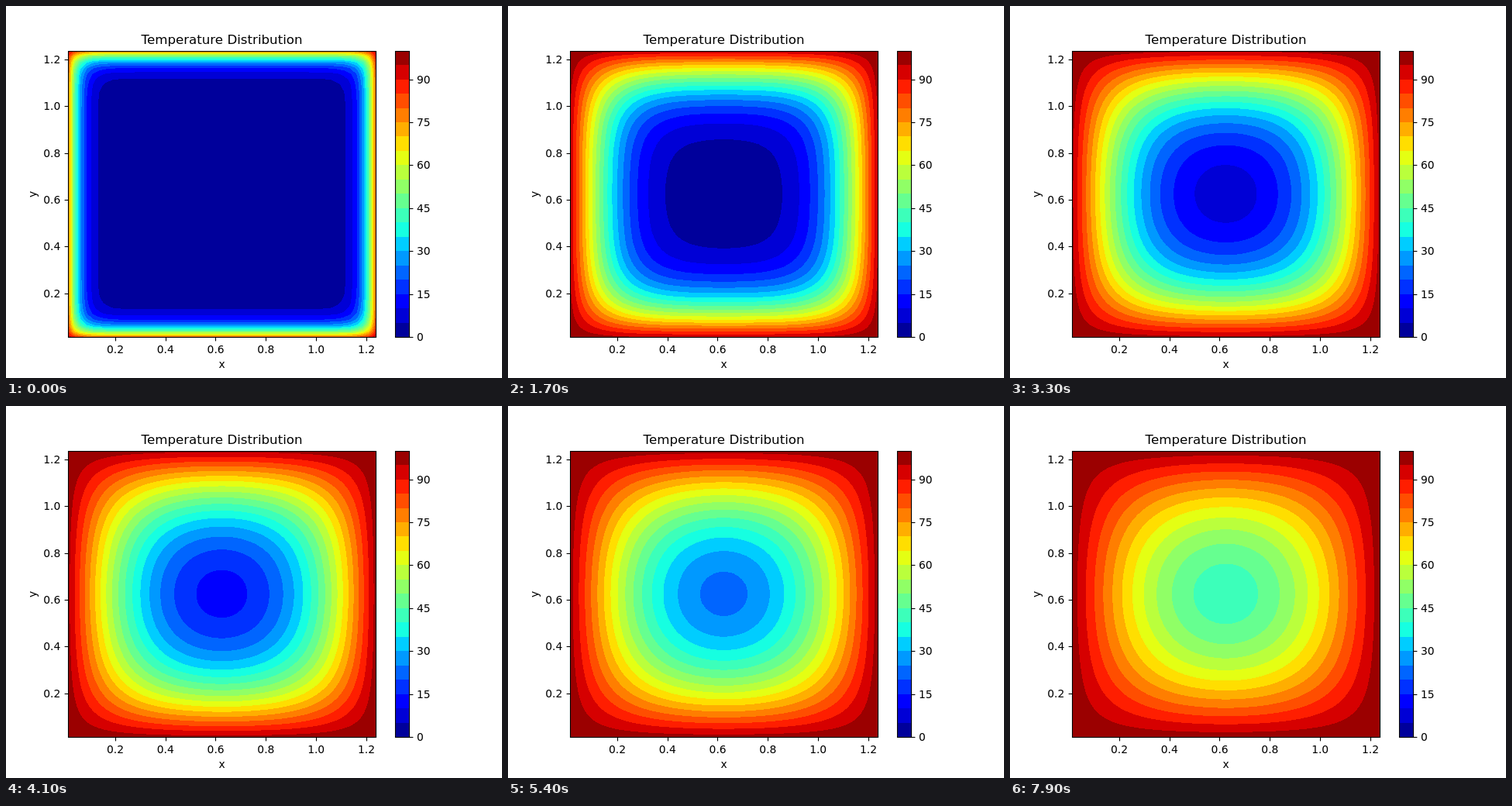
An HTML page with a canvas for the animation above (8000 ms loop, 640 px wide and 480 px high).

```html
<!DOCTYPE html>
<html lang="en">
<head>
<meta charset="utf-8">
<title>Temperature Distribution</title>
<style>
  html, body { margin: 0; width: 100%; height: 100%; overflow: hidden; background: #fff; }
  canvas, svg { position: absolute; left: 0; top: 0; }
  text { font: 13.89px "DejaVu Sans", sans-serif; }
  .title { font-size: 16.67px; }
  path, rect { fill: none; stroke: #000; stroke-width: 1.11; }
</style>
</head>
<body>
<canvas id="stage" width="640" height="480"></canvas>
<svg id="axes" width="640" height="480"></svg>
<script>
const ctx = document.getElementById('stage').getContext('2d');
const LEFT = 80, TOP = 57.6, WIDTH = 396.8, HEIGHT = 369.6, BOTTOM = TOP + HEIGHT;
const CELLS = 50, SIZE = 1.25, CELL = SIZE / CELLS, SPAN = SIZE - CELL;
const STEP = 0.001;              // diffusivity times time step
const FRAMES = 80, FRAME_MS = 100;

// Jet colour map, sampled at the middle of 20 bands
const ramp = (v, stops) => {
  let i = 1;
  while (i < stops.length - 1 && v > stops[i][0]) i++;
  const [x0, y0] = stops[i - 1], [x1, y1] = stops[i];
  return Math.round(255 * (y0 + (y1 - y0) * (v - x0) / (x1 - x0)));
};
const JET = [
  [[0, 0], [.35, 0], [.66, 1], [.89, 1], [1, .5]],
  [[0, 0], [.125, 0], [.375, 1], [.64, 1], [.91, 0], [1, 0]],
  [[0, .5], [.11, 1], [.34, 1], [.65, 0], [1, 0]]
];
const bands = Array.from({ length: 20 }, (_, i) => {
  const v = Math.floor((i + .5) / 20 * 256) / 255;
  return JET.map(stops => ramp(v, stops));
});
const packed = bands.map(([r, g, b]) => (255 << 24 | b << 16 | g << 8 | r) >>> 0);

// Axes and labels
let marks = '';
const label = (s, x, y, anchor = 'middle', extra = '') =>
  marks += `<text x="${x}" y="${y}" text-anchor="${anchor}" ${extra}>${s}</text>`;
const line = d => marks += `<path d="${d}"/>`;
const frame = (x, w) => marks += `<rect x="${x}" y="58.5" width="${w}" height="369"/>`;

frame(80.5, 397);
frame(502.5, 18);
for (let i = 1; i <= 6; i++) {
  const v = i / 5, f = (v - CELL / 2) / SPAN;
  const x = LEFT + f * WIDTH, y = Math.round(BOTTOM - f * HEIGHT);
  line(`M${Math.round(x) + .5} 428v4.4`);
  line(`M80 ${y + .5}h-4.4`);
  label(v.toFixed(1), x + .3, 448);
  label(v.toFixed(1), 70.3, y + 5, 'end');
}
for (let v = 0; v <= 90; v += 15) {
  const y = Math.round(BOTTOM - v / 100 * HEIGHT);
  line(`M521 ${y + .5}h4.4`);
  label(v, 530, y + 5, 'start');
}
label('Temperature Distribution', 278.6, 49, 'middle', 'class="title"');
label('x', 278.6, 467);
label('y', 0, 0, 'middle', 'transform="translate(39 243) rotate(-90)"');
document.getElementById('axes').innerHTML = marks;

bands.forEach(([r, g, b], i) => {
  const edge = k => Math.round(BOTTOM - k * HEIGHT / 20);
  ctx.fillStyle = `rgb(${r},${g},${b})`;
  ctx.fillRect(502, edge(i + 1), 18, edge(i) - edge(i + 1));
});

// Odd sine modes of the cell grid, interpolated linearly to pixel centres
const modes = Array.from({ length: CELLS / 2 }, (_, m) => 2 * m + 1);
const rates = modes.map(j => (2 - 2 * Math.cos(j * Math.PI / CELLS)) / CELL ** 2 * STEP);
const sample = (j, count, first, length) => Float64Array.from({ length: count }, (_, p) => {
  const u = Math.min(Math.max((first + p) / length, 0), 1) * (CELLS - 1);
  const i = Math.min(Math.floor(u), CELLS - 2), t = u - i;
  const wave = c => Math.sin(j * Math.PI * (c + .5) / CELLS);
  return 2 / CELLS / Math.sin(j * Math.PI / 2 / CELLS) * (wave(i) * (1 - t) + wave(i + 1) * t);
});
const COLS = 397, ROWS = 369;
const across = modes.map(j => sample(j, COLS, .5, WIDTH));
const down = modes.map(j => sample(j, ROWS, 58.5 - TOP, HEIGHT));

const image = ctx.createImageData(COLS, ROWS);
const pixels = new Uint32Array(image.data.buffer);

function drawField(steps) {
  // Backward Euler damps each pair of modes by 1 / (1 + rate) per step
  const decay = rates.map(a => rates.map(b => (1 + a + b) ** -steps));
  const row = new Float64Array(COLS);
  for (let y = 0; y < ROWS; y++) {
    row.fill(100);
    modes.forEach((_, m) => {
      let sum = 0;
      for (let k = 0; k < modes.length; k++) sum += decay[m][k] * down[k][y];
      const wave = across[m];
      for (let x = 0; x < COLS; x++) row[x] -= 100 * sum * wave[x];
    });
    for (let x = 0; x < COLS; x++)
      pixels[y * COLS + x] = packed[Math.min(Math.max(Math.floor(row[x] / 5), 0), 19)];
  }
  ctx.putImageData(image, 80, 58);
}

const start = performance.now();
let shown = -1;
function tick() {
  const now = Math.floor((performance.now() - start) / FRAME_MS) % FRAMES;
  if (now !== shown) drawField((shown = now) + 2);
  requestAnimationFrame(tick);
}
tick();
</script>
</body>
</html>
```
